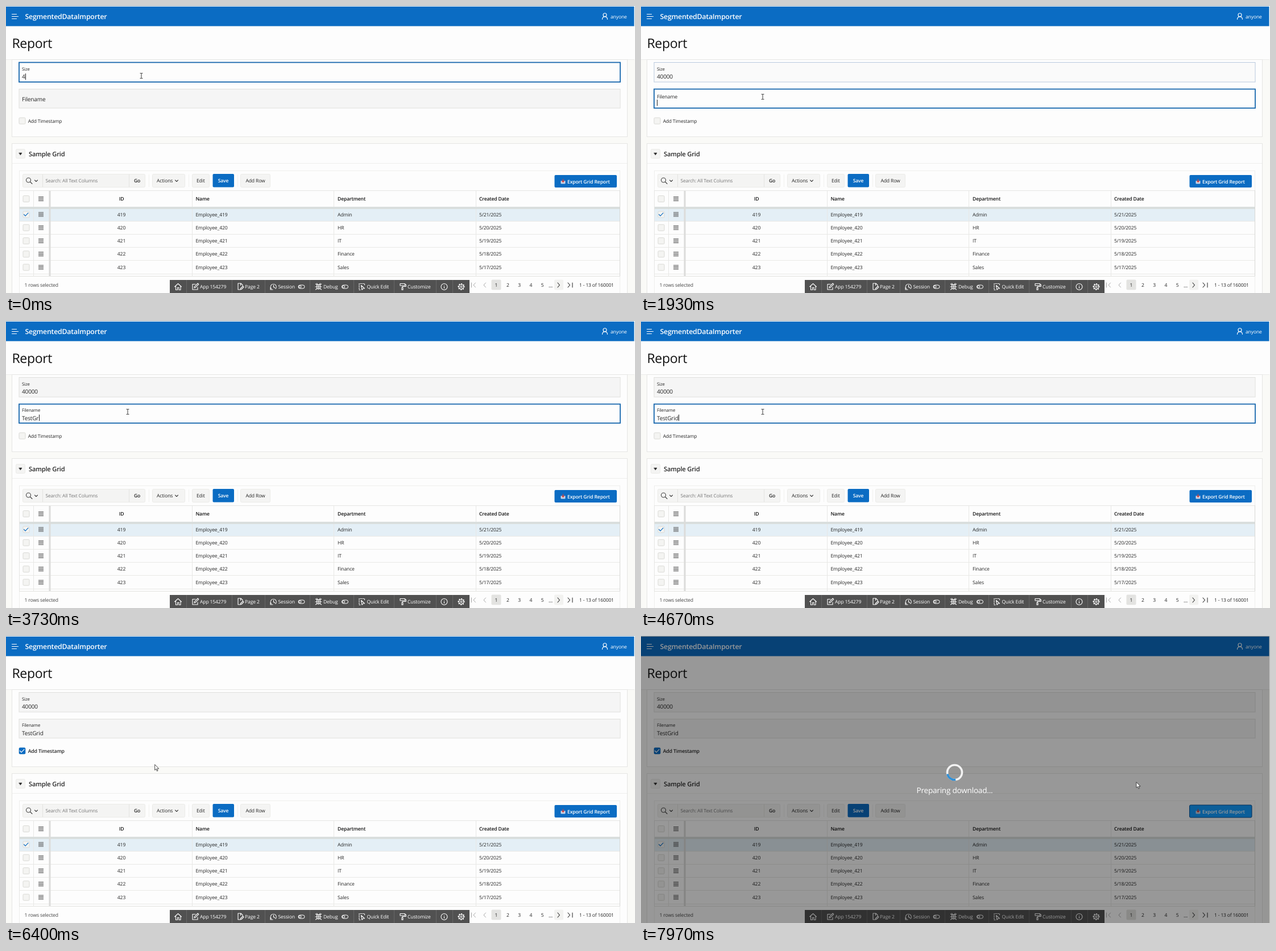
Write an HTML page that moves like this. It is 1106 px wide and 506 px high and loops after 8 s.

```html
<!DOCTYPE html>
<html lang="en">
<head>
<meta charset="utf-8">
<title>Report</title>
<style>
html, body { margin: 0; width: 100%; height: 100%; overflow: hidden; background: #fcfcfb; }
svg { display: block; width: 1106px; height: 506px; }
text { font-family: "Open Sans", "Noto Sans", sans-serif; letter-spacing: -.017em; text-rendering: geometricPrecision; white-space: pre; }
</style>
</head>
<body>
<svg id="stage" viewBox="0 0 1106 506"></svg>
<script>
const LOOP = 8000;
const BLUE = '#0b6cc3', INK = '#262626', LINE = '#e6e6e4', FIELD = '#f5f5f4', FOCUS = '#1766ad';
const stage = document.getElementById('stage');
let layer = stage;

function el(tag, attrs) {
  const node = document.createElementNS('http://www.w3.org/2000/svg', tag);
  set(node, attrs);
  return layer.appendChild(node);
}
function set(node, attrs) {
  for (const key in attrs) node.setAttribute(key, attrs[key]);
}
function group(attrs, draw) {
  const outer = layer;
  const g = layer = el('g', attrs || {});
  draw();
  layer = outer;
  return g;
}
const box = (x, y, x2, y2, fill, stroke = 'none', rx = 0) =>
  el('rect', { x, y, width: x2 - x, height: y2 - y, fill, stroke, rx });
const path = (d, stroke = INK, width = 1, fill = 'none') =>
  el('path', { d, stroke, fill, 'stroke-width': width, 'stroke-linecap': 'round', 'stroke-linejoin': 'round' });
const rule = (x, y, x2, y2, color = LINE) => box(x, y, x2, y2, color);

// y is the middle of the capitals
function place(node, y, size) {
  set(node, { y: y + size * .35, 'font-size': size * .97 });
}
function label(x, y, str, { size = 8.85, weight = 400, fill = INK, anchor = 'start' } = {}) {
  const node = el('text', { x, fill, 'font-weight': weight, 'text-anchor': anchor });
  place(node, y, size);
  node.textContent = str;
  return node;
}
const mid = (x, y, str, opts) => label(x, y, str, { anchor: 'middle', ...opts });
const button = (x, x2, y, y2, fill = '#f4f4f3', stroke = '#ebebe8') =>
  box(x + .5, y + .5, x2 - .5, y2 - .5, fill, stroke, 2);
const tick = (x, y, color) => path(`M${x - 3.5} ${y}l2.5 2.6 5-5.2`, color, 1.2);
const checkbox = (x, y) => box(x - 5.5, y - 5.5, x + 5.5, y + 5.5, '#f4f4f2', '#d9d9d5', 1.5);
const bars = (x, y) => { for (let i = 0; i < 4; i++) rule(x - 4.5, y - 4 + i * 2.3, x + 4.5, y - 3 + i * 2.3, '#4c4c4c'); };

// page
box(0, 0, 1106, 506, '#fafaf7');
box(0, 36, 1106, 94, '#fdfdfd');
box(0, 1, 1104.5, 35.5, BLUE);
path('M10.5 14.5h8M10.5 18.5h11M10.5 22.5h8', '#fff', 1.2);
label(33.5, 18.5, 'SegmentedDataImporter', { size: 12.7, weight: 600, fill: '#fff' });
path('M1048.5 23.5c0-6 9-6 9 0M1050 15.8a3 3 0 1 0 6 0a3 3 0 1 0-6 0', '#fff', 1.1);
label(1063, 18.5, 'anyone', { fill: '#fff' });
label(10.5, 66, 'Report', { size: 23.8, weight: 500, fill: '#111' });
rule(0, 94, 1105, 95, '#ececea');

// form
box(10.5, 94.5, 1092.5, 230.5, '#fdfdfd', LINE);
const sizeBox = box(23, 99.5, 1080, 134, FIELD);
label(28, 111, 'Size', { size: 8 });
const sizeText = label(28, 124.5, '4', { size: 10.4 });
const nameBox = box(23, 146.5, 1080, 180, FIELD);
const nameLabel = label(28, 164, 'Filename');
const nameText = label(28, 171, '', { size: 10.4 });
const squiggle = path('M29 176.8H65', '#b06a6a', 1);
set(squiggle, { 'stroke-dasharray': '.6 2' });
const caret = box(0, 0, 1, 11, '#222');
checkbox(28.5, 202.5);
const stampOff = label(38.7, 203, 'Add Timestamp', { size: 8.65 });
const stampOn = group({}, () => {
  box(22.8, 196.8, 34.2, 208.2, BLUE, 'none', 2);
  tick(28, 202.5, '#fff');
  label(38.7, 203, 'Add Timestamp', { size: 9, weight: 600 });
});

// grid region
box(10.5, 242.5, 1092.5, 520, '#fdfdfd', LINE);
button(17, 34, 252, 269);
path('M23 259h5l-2.5 3.6z', '#222', .6, '#222');
label(40, 261, 'Sample Grid', { size: 11.5, weight: 600 });
rule(11, 277, 1092, 278, '#efefed');
box(23.5, 290.5, 1079.5, 520, '#fdfdfd', '#efefed');

// grid toolbar
button(29, 245, 296, 320);
rule(64, 297, 65, 319, '#e4e4e1');
rule(216, 297, 217, 319, '#e4e4e1');
path('M35.5 307a4 4 0 1 0 8 0a4 4 0 1 0-8 0M42.5 310l3.5 3.5', '#444', 1.1);
const chevron = (x, y) => path(`M${x - 2.5} ${y - 1}l2.5 2.5 2.5-2.5`, '#444', 1.1);
chevron(53, 308);
label(69.5, 308, 'Search: All Text Columns', { size: 8.65, fill: '#777' });
mid(230.5, 308, 'Go', { weight: 600 });
button(257, 315, 296, 320);
label(265, 308, 'Actions');
chevron(300, 308);
for (const x of [251, 321, 407]) rule(x, 297, x + 1, 319, '#f1f1ef');
button(327, 358, 296, 320);
mid(342.3, 308, 'Edit');
box(363.5, 296, 401, 319.5, BLUE, 'none', 2);
mid(382, 308, 'Save', { weight: 600, fill: '#fff' });
button(412, 465, 296, 320);
mid(438.5, 308, 'Add Row');
const exportBox = box(964.5, 298, 1074, 320, BLUE, 'none', 2);
box(975.5, 308, 983.5, 313.5, '#c9d3e6', 'none', 1);
path('M979.5 305.5v4.5M977.7 308.5l1.8 2 1.8-2', '#d2453f', 1.3);
label(987, 309.5, 'Export Grid Report', { weight: 600, fill: '#fff' });

// table
const columns = [[203, 'ID', 'middle'], [333.5, 'Name'], [583, 'Department'], [832, 'Created Date']];
const rows = ['Admin', 'HR', 'IT', 'Finance', 'Sales'];
rule(23, 325, 1080, 326);
for (const [x, name, anchor] of columns) label(x, 340, name, { weight: 600, fill: '#111', anchor });
checkbox(35.5, 340);
bars(61.5, 340);
box(24, 358, 1079, 379, '#e4eff6');
rows.forEach((dept, i) => {
  const y = 367.5 + i * 23.3, id = 419 + i;
  [id, 'Employee_' + id, dept, `5/${21 - i}/2025`].forEach((str, c) =>
    label(columns[c][0], y, str, { anchor: columns[c][2] }));
  checkbox(35.5, y);
  if (!i) tick(35, y, BLUE);
  bars(61.5, y);
  rule(24, Math.round(y + 11), 1079, Math.round(y + 12), '#e9e9e6');
});
for (const x of [48, 327, 576, 826]) rule(x, 326, x + 1, 476, '#e8e8e6');
rule(23, 354, 1080, 358, '#d9dedd');
rule(75.5, 326, 78.5, 476, '#dcdcda');
rule(23, 325, 24, 476);
rule(1079, 325, 1080, 476, '#d8d8d5');
rule(23, 476, 1080, 477, '#e2e2df');

// footer
label(32.5, 492, '1 rows selected', { fill: '#444' });
box(853.5, 482.5, 870.5, 500.5, '#e3e3e1', 'none', 2);
box(964, 482.5, 980, 500.5, '#f2f2f0', 'none', 2);
[862, 882.5, 902.7, 923, 943.2].forEach((x, i) => mid(x, 492, i + 1));
label(954, 492, '...', { size: 10 });
path('M818.5 488v8M825.5 488l-3.5 4 3.5 4M843.5 488l-3.5 4 3.5 4', '#aaa', 1);
path('M970 488l3.5 4-3.5 4M988 488l3.5 4-3.5 4M996 488v8', '#333', 1.1);
label(1008, 492, '1 - 13 of 160001', { size: 8.75 });

// developer bar
box(288, 483, 815, 506, '#515151');
for (const x of [317, 397, 455, 534, 611, 682, 756, 785]) rule(x, 483, x + 1, 506, '#676767');
const white = d => path(d, '#fff', 1.1);
const items = [[341, 'App 154279'], [420, 'Page 2'], [478.5, 'Session'], [558, 'Debug'], [634.5, 'Quick Edit'], [706, 'Customize']];
for (const [x, str] of items) label(x, 495, str, { fill: '#fff' });
white('M296.5 495l6-5.5 6 5.5M298.5 494v6.5h3v-4h2.5v4h3V494');
white('M333 490.5h-5v9.5h9v-4M331 497l.6-2.4 5.6-5.6 1.6 1.6-5.6 5.6z');
white('M411 500h-3v-11h5l3 3v1M412.5 489v3.5M412 500l.5-2 4-4 1.5 1.5-4 4z');
white('M466.5 498.5a5 5 0 1 1 7.5 0M470.5 492v3.5l2.5 1.5M465 496v4h4');
white('M546.5 495a3 4 0 1 0 6 0a3 4 0 1 0-6 0M549.5 491v8M544.5 490l2.5 2M554.5 490l-2.5 2M544 495h11M544.5 500l2.5-2M554.5 500l-2.5-2M547.5 490.5l-1-1.5M551.5 490.5l1-1.5');
for (const x of [514, 590.5]) {
  box(x, 492, x + 11, 498, 'none', '#fff', 3);
  el('circle', { cx: x + 3, cy: 495, r: 2, fill: 'none', stroke: '#fff' });
}
const pick = white('M623 500.5h-2v-11h9.500v3');
set(pick, { 'stroke-dasharray': '2 1.8' });
white('M624.500 492.500l6 5.500-3 .2-1.500 2.300z');
white('M693 489.500h8.500v3.500H693zM701.500 491h1.800v3.500H697v2M696 496.500h2v4h-2z');
white('M765 495a5.500 5.500 0 1 0 11 0a5.500 5.500 0 1 0-11 0M770.500 494.500v3M770.500 492.200v.1');
const gear = el('circle', { cx: 800.5, cy: 495, r: 5, fill: 'none', stroke: '#fff', 'stroke-width': 2, 'stroke-dasharray': '2 1.927' });
set(gear, { transform: 'rotate(-11 800.5 495)' });
white('M796.500 495a4 4 0 1 0 8 0a4 4 0 1 0-8 0M799 495a1.500 1.500 0 1 0 3 0a1.500 1.500 0 1 0-3 0');

// waiting overlay
let arc;
const overlay = group({}, () => {
  box(0, 0, 1105.5, 506, 'rgba(0,0,0,.4)');
  const ring = { cx: 551.5, cy: 240.5, r: 13, fill: 'none', 'stroke-width': 3.6 };
  el('circle', { ...ring, stroke: '#f2f2f2' });
  arc = el('circle', { ...ring, stroke: '#2f8fd6', pathLength: 360, 'stroke-dasharray': '85 275' });
  mid(551.5, 272.5, 'Preparing download...', { size: 14, fill: '#fff' });
});

// pointers, each with its hot spot at 0,0
const pointers = {
  beam: group({}, () => path('M-2-4.500h1.500l.5.5.5-.5H2M0-4V4M-2 4.500h1.500l.5-.5.5.5H2', '#222', .9)),
  arrow: group({}, () => path('M0 0V9.500L2.200 7.500 3.800 11.200 5.400 10.500 3.800 7H6.800z', '#222', .8, '#fff')),
  hand: group({}, () => path('M-1 6V.5a1 1 0 0 1 2 0V4l4 1v3.500l-1 2.500H-.5L-3.500 7.200a.9.9 0 0 1 1.200-1.200z', '#222', .8, '#fff'))
};

// timeline
const CLICK_NAME = 1850, CLICK_STAMP = 5830, CLICK_EXPORT = 7420;
const sizeKeys = [0, 120, 230, 330, 430];
const nameKeys = [2500, 2690, 2860, 3030, 3420, 3640, 3880, 4200];
const moves = [[0, 238, 123], [1300, 238, 123], [1750, 214, 160], [4700, 214, 160], [5400, 25.5, 201],
  [6050, 25.5, 201], [7150, 1007.5, 309], [7560, 1007.5, 309], [7900, 871, 258]];

const clamp = v => Math.min(1, Math.max(0, v));
const mix = (a, b, k) => a + (b - a) * k;
const typed = (str, keys, t) => str.slice(0, keys.filter(k => k <= t).length);
const show = (node, on) => { node.style.display = on ? '' : 'none'; };

function pointerAt(t) {
  let i = moves.length - 1;
  while (moves[i][0] > t) i--;
  const a = moves[i], b = moves[i + 1] || a;
  const k = clamp((t - a[0]) / (b[0] - a[0] || 1));
  const e = k * k * (3 - 2 * k);
  return [mix(a[1], b[1], e), mix(a[2], b[2], e)];
}

function frameField(node, focused, fade) {
  const shade = Math.round(mix(253, 245, fade));
  set(node, {
    fill: focused ? '#fdfdfd' : `rgb(${shade},${shade},${shade})`,
    stroke: focused ? FOCUS : fade < 1 ? '#b9c9de' : '#e0e0dd',
    'stroke-width': focused ? 1.8 : 1
  });
}

function render(t) {
  const waiting = t >= CLICK_EXPORT;
  const inName = t >= CLICK_NAME && t < CLICK_STAMP;
  const inSize = t < CLICK_NAME;
  const stamped = t >= CLICK_STAMP;

  sizeText.textContent = typed('40000', sizeKeys, t);
  nameText.textContent = typed('TestGrid', nameKeys, t);
  frameField(sizeBox, inSize, clamp((t - CLICK_NAME) / 200));
  frameField(nameBox, inName, inSize ? 1 : clamp((t - CLICK_STAMP) / 200));
  const float = clamp((t - CLICK_NAME) / 140);
  place(nameLabel, mix(164, 157.5, float), mix(10.4, 8.1, float));

  const active = inSize ? sizeText : nameText;
  const lastEdit = Math.max(...[...sizeKeys, CLICK_NAME, ...nameKeys].filter(k => k <= t));
  show(caret, (inSize || inName) && (t - lastEdit) % 1000 < 500);
  const width = active.textContent ? active.getComputedTextLength() : 0;
  set(caret, { x: Math.round(28.3 + width), y: inSize ? 119 : 165 });
  show(squiggle, t >= 4900 && inName);
  show(stampOff, !stamped);
  show(stampOn, stamped);

  const [x, y] = pointerAt(t);
  const overExport = x > 965 && x < 1074 && y > 298 && y < 320;
  const overField = x > 23 && x < 1080 && (y > 99 && y < 134 || y > 146 && y < 181);
  const kind = waiting ? 'arrow' : overExport ? 'hand' : overField ? 'beam' : 'arrow';
  for (const name in pointers) show(pointers[name], name === kind);
  set(pointers[kind], { transform: `translate(${x} ${y})` });

  set(exportBox, { fill: waiting ? '#129cff' : overExport ? '#0a5aa6' : BLUE, stroke: waiting ? '#0a4f92' : 'none' });
  show(overlay, waiting);
  set(arc, { transform: `rotate(${82 + (t - 7970) * .36} 551.5 240.5)` });
}

const start = performance.now();
function tickFrame() {
  render((performance.now() - start) % LOOP);
  requestAnimationFrame(tickFrame);
}
tickFrame();
</script>
</body>
</html>
```
